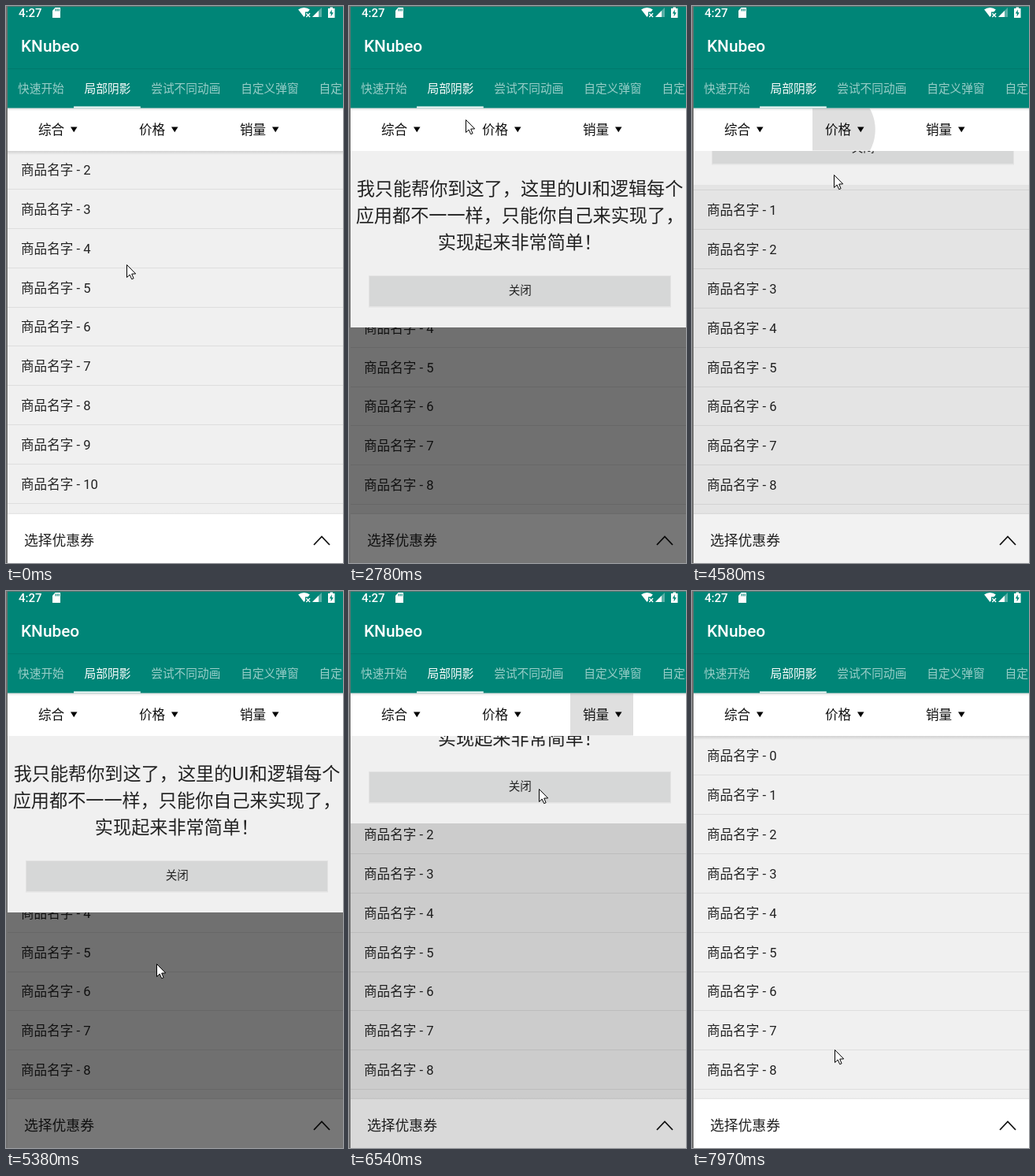
An HTML page with a canvas for the animation above (8000 ms loop, 428 px wide and 707 px high).

```html
<!DOCTYPE html>
<html lang="zh-CN">
<head>
<meta charset="utf-8">
<title>Partial shadow demo</title>
<style>
html, body { margin: 0; width: 100%; height: 100%; overflow: hidden; background: #f0f0f0; }
canvas { display: block; width: 428px; height: 707px; }
</style>
</head>
<body>
<canvas id="stage"></canvas>
<script>
const W = 428, H = 707, LOOP = 8000, STEP = 89.6;
const TEAL = '#008577', INK = '#222', CLEAR = 'rgba(0,0,0,0)';
const HEAD_END = 129.5, BAR_END = 184, PANEL_H = 224, DOCK_TOP = 645;
const ROW_H = 49.87, COL_W = 128, TAB_SIZE = 14.7;
const FONT = 'Roboto, "Noto Sans CJK SC", "Noto Sans CJK", sans-serif';

const canvas = document.getElementById('stage');
const ctx = canvas.getContext('2d');
const dpr = window.devicePixelRatio || 1;
canvas.width = W * dpr;
canvas.height = H * dpr;

const tabs = ['快速开始', '局部阴影', '尝试不同动画', '自定义弹窗', '自定义动画'];
const filters = ['综合', '价格', '销量'];
const message = ['我只能帮你到这了，这里的UI和逻辑每个', '应用都不一一样，只能你自己来实现了，', '实现起来非常简单！'];

// When each filter's panel opens and is dismissed
const openings = [
  { open: 1330, close: 3215 },
  { open: 4453, close: 5545 },
  { open: 6365, close: 7400 }
];

// Pointer moves: start time, end time, destination
const home = { x: 153, y: 328 };
const moves = [
  { from: 270, to: 910, x: 71, y: 156 },
  { from: 1400, to: 2200, x: 87, y: 303 },
  { from: 2200, to: 3040, x: 156, y: 72 },
  { from: 3220, to: 3760, x: 130, y: 153 },
  { from: 3860, to: 4300, x: 176, y: 160 },
  { from: 4400, to: 5376, x: 191, y: 473 },
  { from: 5500, to: 6085, x: 311, y: 150 },
  { from: 6365, to: 6540, x: 241, y: 251 },
  { from: 6540, to: 7970, x: 181, y: 582 }
];

const clamp = x => Math.max(0, Math.min(1, x));
const mix = (a, b, k) => a + (b - a) * k;

// Material standard curve, cubic-bezier(.4, 0, .2, 1)
function ease(x) {
  if (x <= 0) return 0;
  if (x >= 1) return 1;
  let lo = 0, hi = 1, s = 0.5;
  for (let i = 0; i < 18; i++) {
    s = (lo + hi) / 2;
    const u = 1 - s;
    if (1.2 * u * u * s + 0.6 * u * s * s + s * s * s < x) lo = s; else hi = s;
  }
  return s * s * (3 - 2 * s);
}

// The hand bends its path: x slows towards the end, y is steady
function pointerAt(t) {
  let { x, y } = home;
  for (const m of moves) {
    const k = clamp((t - m.from) / (m.to - m.from));
    x = mix(x, m.x, Math.sin(k * Math.PI / 2));
    y = mix(y, m.y, k);
  }
  return { x, y };
}

function phase(t, o, inTime, outTime) {
  return t < o.close ? ease((t - o.open) / inTime) : 1 - ease((t - o.close) / outTime);
}

function box(x, y, w, h, fill) {
  ctx.fillStyle = fill;
  ctx.fillRect(x, y, w, h);
}

function poly(points, fill) {
  ctx.beginPath();
  points.forEach(([x, y]) => ctx.lineTo(x, y));
  ctx.closePath();
  ctx.fillStyle = fill;
  ctx.fill();
}

function line(points, width, color) {
  ctx.beginPath();
  points.forEach(([x, y]) => ctx.lineTo(x, y));
  ctx.lineWidth = width;
  ctx.strokeStyle = color;
  ctx.stroke();
}

// Text placed by the middle of its glyphs, baseline on a whole pixel
function label(str, x, mid, size, fill, align = 'left', weight = 400) {
  ctx.font = `${weight} ${size}px ${FONT}`;
  ctx.textAlign = align;
  ctx.fillStyle = fill;
  ctx.fillText(str, x, Math.round(mid + size * 0.36));
}

function fade(y, h, from, to) {
  const g = ctx.createLinearGradient(0, y, 0, y + h);
  g.addColorStop(0, from);
  g.addColorStop(1, to);
  box(0, y, W, h, g);
}

function clipped(x, y, w, h, draw) {
  ctx.save();
  ctx.beginPath();
  ctx.rect(x, y, w, h);
  ctx.clip();
  draw();
  ctx.restore();
}

function wifi(x, y) {
  ctx.beginPath();
  ctx.moveTo(x, y + 12);
  ctx.arc(x, y + 12, 12, -Math.PI * 0.71, -Math.PI * 0.29);
  ctx.fillStyle = '#fff';
  ctx.fill();
  box(x + 1.5, y + 5.5, 7, 7.5, TEAL);
  for (const d of [-2.4, 2.4]) line([[x + 5.2 - d, y + 7.2], [x + 5.2 + d, y + 12]], 1.4, '#fff');
}

function signal(x, y, size, fill) {
  poly([[x, y], [x + size, y], [x + size, y - size]], fill);
}

function statusBar() {
  label('4:27', 16, 9, 15, '#fff', 'left', 500);
  poly([[62.5, 2], [69, 2], [69, 15], [59, 15], [59, 6]], '#fff');
  for (let i = 0; i < 3; i++) box(62.5 + i * 2.1, 3.5, 1.1, 3, TEAL);
  wifi(378.5, 2);
  signal(389, 14, 12, 'rgba(255,255,255,.35)');
  signal(389, 14, 8, '#fff');
  box(411.5, 1.5, 3.5, 2, '#fff');
  box(409, 3, 8.5, 12, '#fff');
  poly([[413.8, 4.5], [410.8, 9.6], [412.8, 9.6], [412.6, 13.5], [415.8, 8.3], [413.7, 8.3]], TEAL);
}

function header() {
  box(0, 0, W, HEAD_END, TEAL);
  statusBar();
  label('KNubeo', 19, 51, 20.8, '#fff', 'left', 500);
  fade(79, 2, 'rgba(0,0,0,.1)', CLEAR);
  let x = 15;
  tabs.forEach((name, i) => {
    const active = i === 1, width = name.length * TAB_SIZE;
    label(name, x, 104.7, TAB_SIZE, active ? '#fff' : 'rgba(255,255,255,.6)', 'left', active ? 500 : 400);
    if (active) box(Math.round(x) - 14, HEAD_END - 2, width + 26, 2, '#fff');
    x += width + 25.8;
  });
}

function ripple(t, o, i) {
  const age = t - o.open;
  if (age < 0 || age > 600) return;
  clipped(25 + COL_W * i, 130, 80, 53.5, () => {
    ctx.globalAlpha = 1 - clamp((age - 220) / 360);
    ctx.beginPath();
    ctx.arc(pointerAt(o.open).x, 157, 31 + 0.21 * age, 0, 7);
    ctx.fillStyle = '#dfdfdf';
    ctx.fill();
  });
}

function filterBar(t) {
  box(0, 129, W, BAR_END - 129, '#fff');
  openings.forEach((o, i) => ripple(t, o, i));
  fade(129, 4, 'rgba(0,0,0,.16)', CLEAR);
  filters.forEach((name, i) => {
    const x = 41 + COL_W * i;
    label(name, x, 157, 16.6, '#111');
    poly([[x + 41, 153.5], [x + 49.5, 153.5], [x + 45.2, 160.3]], '#000');
  });
}

function goods(t) {
  const scroll = -101 * Math.pow(1 - clamp(t / 720), 3);
  clipped(0, BAR_END, W, DOCK_TOP - BAR_END, () => {
    box(0, BAR_END, W, DOCK_TOP - BAR_END, '#f0f0f0');
    for (let i = 0; i < 13; i++) {
      const mid = 209.2 + ROW_H * i + scroll;
      label('商品名字 - ' + i, 19, mid, 16.6, INK);
      box(0, Math.round(mid + 24), W, 1, '#dedede');
    }
    fade(BAR_END, 5, 'rgba(0,0,0,.13)', CLEAR);
  });
}

function dock() {
  fade(DOCK_TOP - 2, 2, CLEAR, 'rgba(0,0,0,.06)');
  box(0, DOCK_TOP, W, H - DOCK_TOP, '#fff');
  label('选择优惠券', 23, 678.7, 17.8, INK);
  line([[391, 684], [401, 673.5], [411, 684]], 1.8, '#111');
}

function panel(t) {
  const o = openings.find(p => t >= p.open && t < p.close + 540);
  if (!o) return;
  const shade = phase(t, o, 660, 540), shown = phase(t, o, 505, 460);
  clipped(0, BAR_END, W, H - BAR_END, () => {
    box(0, BAR_END, W, H, `rgba(0,0,0,${0.533 * shade})`);
    ctx.translate(0, Math.round((shown - 1) * PANEL_H));
    box(0, BAR_END, W, PANEL_H, '#f0f0f0');
    message.forEach((str, i) => label(str, 217, 231.5 + 34.2 * i, 23.15, INK, 'center'));
    box(25, 342, 384, 40.5, '#e3e3e3');
    box(26, 343, 382, 38, '#d6d7d7');
    label('关闭', 217.3, 361, 14.6, INK, 'center');
  });
}

function pointer(t) {
  const { x, y } = pointerAt(t);
  const shape = [[0, 0], [0, 16], [3.7, 12.6], [6.2, 18.2], [8.6, 17.2], [6.2, 11.6], [11.2, 11.4], [0, 0]];
  ctx.save();
  ctx.translate(Math.round(x) + 0.5, Math.round(y) + 0.5);
  poly(shape, '#fff');
  line(shape, 1, '#000');
  ctx.restore();
}

function draw(t) {
  ctx.setTransform(dpr, 0, 0, dpr, 0, 0);
  goods(t);
  dock();
  filterBar(t);
  header();
  panel(t);
  box(0, 0, W, 1, '#56736f');
  box(0, 0, 2, H, '#707070');
  pointer(t);
}

// The screen refreshes in steps, about eleven a second
function tick() {
  const t = performance.now() % LOOP;
  draw(Math.floor((t + 10) / STEP) * STEP);
  requestAnimationFrame(tick);
}
tick();
</script>
</body>
</html>
```
